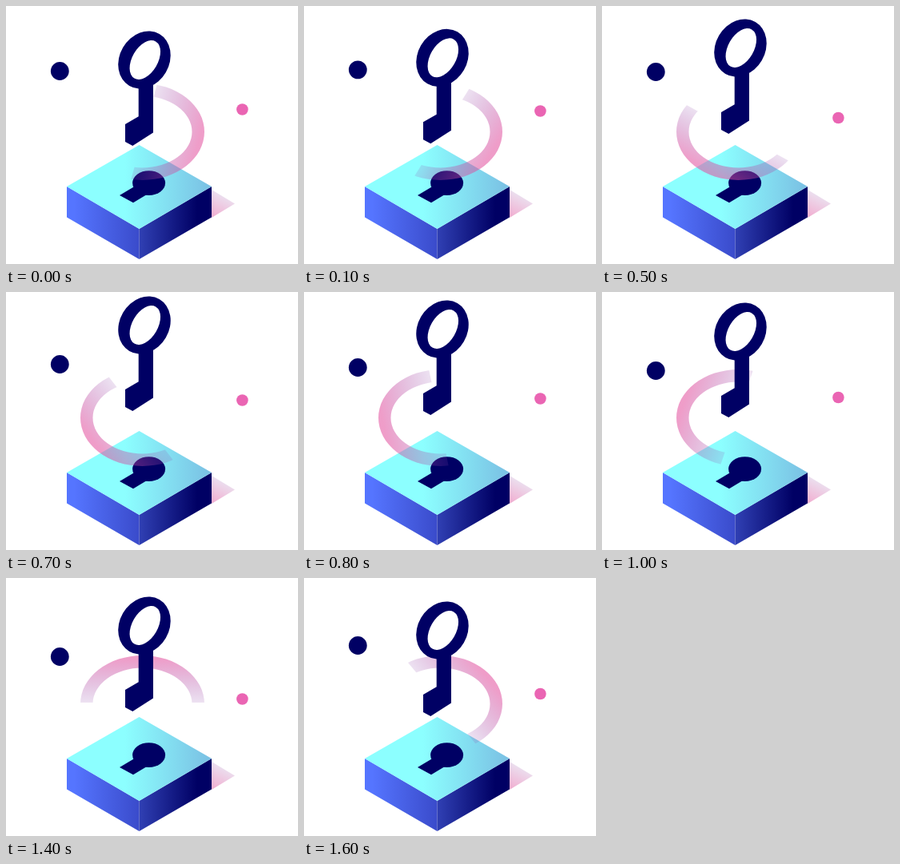
An HTML page that plays this animation: 365 px wide and 323 px high, repeating every 1700 ms.

```html
<!DOCTYPE html>
<html lang="en">
<head>
<meta charset="utf-8">
<title>Lock and key</title>
<style>
  @property --key  { syntax: "<number>"; inherits: true; initial-value: 0; }
  @property --turn { syntax: "<number>"; inherits: true; initial-value: 12; }
  @property --navy { syntax: "<number>"; inherits: true; initial-value: 81.5; }
  @property --pink { syntax: "<number>"; inherits: true; initial-value: 129.5; }

  html, body { margin: 0; width: 100%; height: 100%; overflow: hidden; background: #fff; }
  svg { display: block; width: 365px; height: 323px; animation: play 1.7s infinite; }

  .key  { transform: translateY(calc(var(--key) * 1px)); }
  .turn { transform: rotate(calc(var(--turn) * 1deg)); }
  .navy { transform: translate(67.3px, calc(var(--navy) * 1px)); }
  .pink { transform: translate(295.4px, calc(var(--pink) * 1px)); }
  .ink  { fill: #000064; }

  /* Ten poses a second, with short rests at 0.8 s and 1.2 s */
  @keyframes play {
    0%     { --key: 0;   --turn: 12;  --navy: 81.5; --pink: 129.5; animation-timing-function: steps(3); }
    17.64% { --key: -8;  --turn: 54;  --navy: 76.5; --pink: 135.5; animation-timing-function: steps(2); }
    29.41% { --key: -15; --turn: 125; --navy: 82.5; --pink: 140;   animation-timing-function: steps(1); }
    35.29% { --key: -19; --turn: 137; --navy: 86.5; --pink: 138;   animation-timing-function: steps(1); }
    41.17% { --key: -26; --turn: 149; --navy: 90.5; --pink: 135.5; animation-timing-function: steps(1); }
    47.05% { --key: -21; --turn: 171; --navy: 94.5; --pink: 133.5; animation-timing-function: steps(1); }
    58.82% { --key: -18; --turn: 195; --navy: 98.5; --pink: 132;   animation-timing-function: steps(2); }
    70.58% { --key: -10; --turn: 246; --navy: 102;  --pink: 145;   animation-timing-function: steps(1); }
    82.35% { --key: -8;  --turn: 270; --navy: 98.5; --pink: 151.5; animation-timing-function: steps(2); }
    94.11% { --key: -2;  --turn: 327; --navy: 84.5; --pink: 145;   animation-timing-function: steps(1); }
    100%   { --key: 0;   --turn: 372; --navy: 81.5; --pink: 129.5; }
  }
</style>
</head>
<body>
<svg viewBox="0 0 365 323" xmlns="http://www.w3.org/2000/svg">
  <defs>
    <linearGradient id="top">
      <stop offset=".4" stop-color="#8cffff"/>
      <stop offset="1" stop-color="#7abfe3"/>
    </linearGradient>
    <linearGradient id="left">
      <stop offset=".1" stop-color="#5575ff"/>
      <stop offset="1" stop-color="#3a4bcb"/>
    </linearGradient>
    <linearGradient id="right">
      <stop offset="0" stop-color="#3040b4"/>
      <stop offset=".8" stop-color="#000064"/>
    </linearGradient>
    <linearGradient id="shade" gradientUnits="userSpaceOnUse" x1="272" y1="236" x2="259" y2="263">
      <stop offset="0" stop-color="#ebe1f0"/>
      <stop offset="1" stop-color="#f1b0d2"/>
    </linearGradient>
    <linearGradient id="fade" gradientUnits="userSpaceOnUse" x1="0" y1="0" x2="72" y2="0">
      <stop offset="0" stop-color="#8c46aa" stop-opacity=".15"/>
      <stop offset="1" stop-color="#e2509e" stop-opacity=".56"/>
    </linearGradient>
    <clipPath id="ring">
      <path clip-rule="evenodd" d="M93 157.5a77.5 60.5 0 0 1 155 0a77.5 60.5 0 0 1 -155 0z
        M108.5 157.5a62 45 0 0 1 124 0a62 45 0 0 1 -124 0z"/>
    </clipPath>
    <mask id="hole" maskUnits="userSpaceOnUse" x="130" y="20" width="90" height="90">
      <rect x="130" y="20" width="90" height="90" fill="#fff"/>
      <ellipse cx="173.8" cy="67.5" rx="16" ry="26.7" transform="rotate(30 173.8 67.5)"/>
    </mask>
  </defs>

  <path fill="url(#shade)" d="M257 230L286 247.5L257 265z"/>
  <path fill="url(#left)" d="M76 226L166.5 279V317L76 264.5z"/>
  <path fill="url(#right)" d="M166.5 279L257 226V264.5L166.5 317z"/>
  <path fill="url(#top)" d="M166.5 174L257 226L166.5 279L76 226z"/>
  <g class="ink">
    <ellipse cx="178.6" cy="221.6" rx="20.5" ry="15.4"/>
    <path d="M142 237L163 224.5L181 233L159 246.2z"/>
  </g>

  <g clip-path="url(#ring)">
    <g transform="translate(170.5 157.5) scale(1 .78)">
      <rect class="turn" x="2" y="-90" width="88" height="180" fill="url(#fade)"/>
    </g>
  </g>

  <g class="key">
    <g class="ink">
      <g mask="url(#hole)">
        <ellipse cx="173" cy="67.5" rx="31" ry="37.5" transform="rotate(30 173 67.5)"/>
      </g>
      <path d="M165.7 97H184V158.5L158.3 175L149 170V148L165.7 138.3z"/>
    </g>
  </g>

  <circle class="navy ink" r="11.4"/>
  <circle class="pink" r="7.3" fill="#ea65b3"/>
</svg>
</body>
</html>
```
